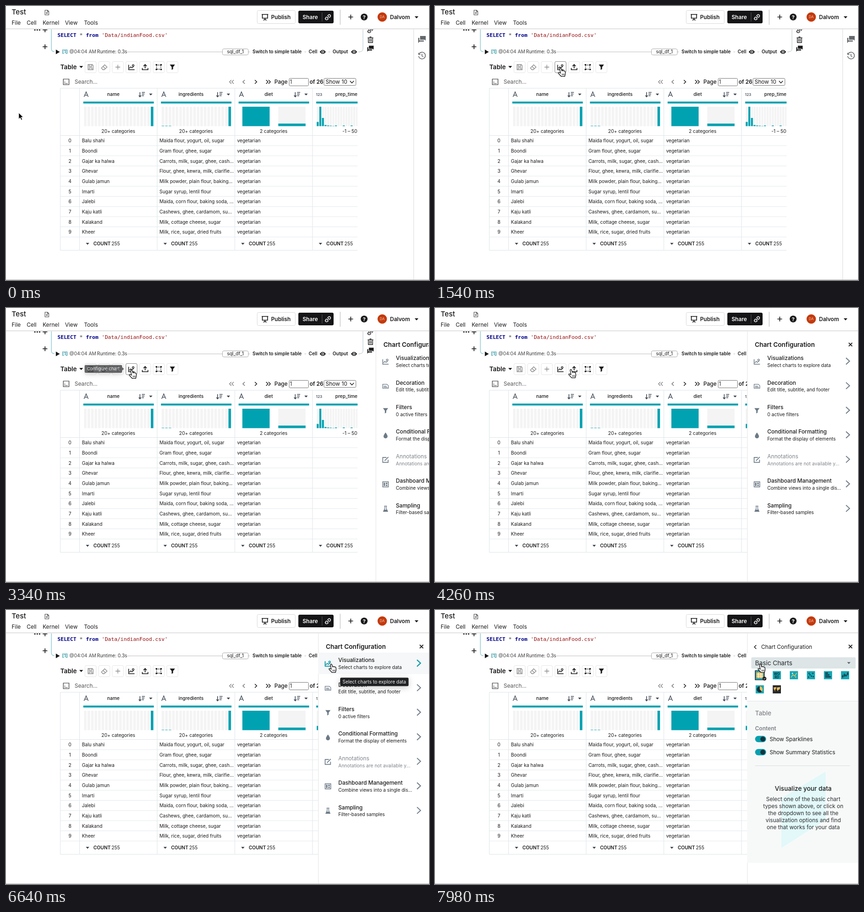
Write an HTML page that moves like this. It is 900 by 585 pixels and loops after 8000 ms.

```html
<!DOCTYPE html>
<html lang="en">
<head>
<meta charset="utf-8">
<title>Notebook chart configuration</title>
<style>
html, body { margin: 0; width: 100%; height: 100%; overflow: hidden; background: #fff; }
svg { display: block; width: 900px; height: 585px; font-family: Inter, sans-serif; }
.mono { font-family: "DejaVu Sans Mono", monospace; white-space: pre; }
.tip { filter: drop-shadow(0 3px 7px #0003); }
</style>
</head>
<body>
<svg id="stage" viewBox="0 0 900 585"></svg>
<script>
const TEAL = '#00a2b1', INK = '#1a1a1a', GRAY = '#6c7a86', GRID = '#dde6ea';
const SMALL = 10, BODY = 11.65, LARGE = 13.3;

const text = (x, y, size, str, { w = 400, fill = INK, anchor = 'start', cls = '' } = {}) =>
  `<text x="${x}" y="${y}" font-size="${size}" font-weight="${w}" fill="${fill}" text-anchor="${anchor}" class="${cls}">${str}</text>`;
const rect = (x, y, w, h, fill, extra = '') =>
  `<rect x="${x}" y="${y}" width="${w}" height="${h}" fill="${fill}" ${extra}/>`;
const box = (x, y, w, h, stroke, r = 3, fill = '#fff') =>
  rect(x + .5, y + .5, w - 1, h - 1, fill, `stroke="${stroke}" rx="${r}"`);
const line = (d, stroke = INK, w = 1, extra = '') =>
  `<path d="${d}" fill="none" stroke="${stroke}" stroke-width="${w}" ${extra}/>`;
const fill = (d, color = INK) => `<path d="${d}" fill="${color}"/>`;
const dot = (x, y, r, color = INK, extra = '') => `<circle cx="${x}" cy="${y}" r="${r}" fill="${color}" ${extra}/>`;
const at = (x, y, content, s = 1) => `<g transform="translate(${x} ${y}) scale(${s})">${content}</g>`;
const group = (id, content, extra = '') => `<g id="${id}" ${extra}>${content}</g>`;
const many = (n, f) => Array.from({ length: n }, (_, i) => f(i)).join('');

// Icons are drawn around their own centre.
const icon = {
  plus: (c = INK, w = 1.7) => line('M-5 0H5M0-5V5', c, w),
  caret: (c = INK) => fill('M-4-2H4L0 2.5Z', c),
  link: c => `<g transform="rotate(-45)">${line('M-1-2.7H-4a2.7 2.7 0 0 0 0 5.4H-1M1-2.7H4a2.7 2.7 0 0 1 0 5.4H1M-3 0H3', c, 1.5)}</g>`,
  eye: () => fill('M-6.5 0Q0-8.5 6.5 0Q0 8.5-6.5 0Z') + dot(0, 0, 2.7, '#fff') + dot(0, 0, 1.5),
  chat: c => fill('M-4-8H8V2L6 0H-4Z', c) + fill('M-8-4H-5.5V1.5H4V4H-5L-8 7Z', c),
  trash: () => line('M-6-4H6M-2-6H2', INK, 1.6) + line('M-4.5-3V6H4.5V-3M-1.5-2V4M1.5-2V4', INK, 1.4),
  clock: c => line('M-6-4A7.2 7.2 0 1 1-7 1M-7-6V-2.5H-3M0-4V0.5L3 2.5', c, 1.5),
  save: c => line('M-5.5-5.5H3.5L5.5-3.5V5.5H-5.5ZM-3-5V-1.5H2.5V-5M-3 5V1.5H3V5', c, 1.3),
  eraser: c => line('M-6 2L1-5 6 0 0 5.5H-3ZM-2.5-1.5L2.5 3.5', c, 1.3),
  chart: c => line('M-6-5V5.5H6.5M-4.5 2.5L-1.5-.5 1 1.5 4.5-1.5', c, 1.5) + dot(3.5, -3.5, 1.9, 'none', `stroke="${c}" stroke-width="1.4"`),
  upload: c => line('M0 2.5V-5M-3.5-2L0-5.5 3.5-2M-6 2V5.5H6V2', c, 1.7),
  frame: c => line('M-4.5-4.5H4.5V4.5H-4.5Z', c, 1.3, 'stroke-dasharray="2 1.4"') +
    [-1, 1].map(x => [-1, 1].map(y => rect(x * 5 - 1.5, y * 5 - 1.5, 3, 3, c)).join('')).join(''),
  funnel: c => fill('M-5.5-5.5H5.5L1.5 0V4L-1.5 6V0Z', c),
  card: c => line('M-6-4H3L6-1V4.5H-6ZM-4 0H2M-4 2.3H4', c, 1.3),
  drop: c => fill('M0-6Q4.3 0 4.3 2.2A4.3 4.3 0 0 1-4.3 2.2Q-4.3 0 0-6Z', c),
  edit: c => line('M2-5H-6V5.5H5.5V0M-2 2L6-6', c, 1.6),
  board: c => line('M-6-5.5H6V5.5H-6Z', c, 1.5) + rect(-4, -3.5, 3, 7, c) + rect(.5, -3.5, 3.5, 3, c) + rect(.5, .8, 3.5, 2.7, c),
  flask: c => line('M-3-6H3M-1.6-6V-1L-4.5 5.5H4.5L1.6-1V-6', c, 1.3) + fill('M-2.5 1.5H2.5L4.5 5.5H-4.5Z', c),
  letter: c => line('M-4.5 5.3L0-5.3 4.5 5.3M-3 1.8H3', c, 1.4),
  sort: c => line('M-3.5-5V4.5M-6 2L-3.5 5-1 2M.5-4.5H7M.5-1H6M.5 2.5H5', c, 1.5)
};

function header() {
  const menu = [[12, 'File'], [44, 'Cell'], [78, 'Kernel'], [125.5, 'View'], [166, 'Tools']];
  return rect(0, 0, 900, 49, '#fff') + line('M0 48.5H900', '#d4d4d4') + line('M0 49.5H900', '#eee') +
    text(12, 18, 15, 'Test', { w: 500 }) + menu.map(([x, s]) => text(x, 40, BODY, s)).join('') +
    at(87, 14, line('M-4-5H1.5L4-2.5V5H-4ZM1-5V-2H4M-2 1H2M0-1V3', '#444', 1.1)) +
    box(534, 9, 82, 29, '#d9d9d9') + at(551, 24, line('M-7-6H7M-5.5-6V2H5.5V-6M0 2V5M-3 6.5L0 4 3 6.5', INK, 1.7)) +
    text(564, 28, BODY, 'Publish', { w: 600 }) +
    rect(622, 10, 75, 27, '#151517', 'rx="3"') + text(631, 28, BODY, 'Share', { w: 600, fill: '#fff' }) +
    line('M672.5 14V33', '#555') + at(685, 24, icon.link('#fff')) +
    line('M711 8V40', '#d8d8d8', 2) + at(733.5, 23.5, icon.plus()) +
    dot(762, 23.5, 7.3) + text(762, 27.5, 11, '?', { w: 700, fill: '#fff', anchor: 'middle' }) +
    dot(800.5, 23.5, 10, '#c43a0c') + text(800.5, 26.3, 7.5, 'DA', { fill: '#f3c9b4', anchor: 'middle' }) +
    text(817, 28, BODY, 'Dalvom', { w: 600 }) + at(873.5, 24, icon.caret());
}

function codeCell() {
  const char = 6.71, label = { w: 600 };
  const code = (column, s, fill, w) => text(109.5 + column * char, 66, char / .602, s, { fill, w, cls: 'mono' });
  return [61.5, 66.5, 71.5].map(x => dot(x, 51, 1.6)).join('') +
    at(83, 51, icon.plus()) + at(83, 87, icon.plus()) +
    line('M96.5 49V91Q96.5 97.5 103 97.5', '#7cc3cd', 1.2) +
    line('M759.5 49V91Q759.5 97.5 753 97.5', '#b9c6ca') +
    code(0, 'SELECT', '#00008b', 700) + code(7, '*', '#333') +
    code(9, 'from', '#00008b', 700) + code(14, "'Data/indianFood.csv'", '#960f0f') +
    fill('M106 93L114.5 98 106 103Z') + text(119.5, 101.3, SMALL, '[1]', { w: 600, fill: '#0e8494' }) +
    text(135, 101.3, SMALL, '@04:04 AM', { fill: '#444' }) + text(193.5, 101.3, SMALL, 'Runtime: 0.3s', { fill: '#333' }) +
    line('M258 98H460M516 98H519M635 98H638.5M686 98H689.5M750 98H753', '#bbb') +
    box(460, 91, 56, 14, '#aaa') + text(488, 101.3, SMALL, 'sql_df_1', { anchor: 'middle' }) +
    text(524.5, 101.3, 9.9, 'Switch to simple table', label) + text(644, 101.3, 9.9, 'Cell', label) + at(674, 98, icon.eye()) +
    text(695, 101.3, 9.9, 'Output', label) + at(740.5, 98, icon.eye()) +
    at(775.5, 51.5, icon.link(INK)) + at(775.5, 72, icon.trash()) + at(775.5, 91.5, icon.chat(INK), .85);
}

function toolbar() {
  const icons = ['save', 'eraser', 'plus', 'chart', 'upload', 'frame', 'funnel'];
  const chevron = (x, d, c) => line(`M${x - 2 * d} 158L${x + 2 * d} 162 ${x - 2 * d} 166`, c, 1.5);
  return text(115.5, 134.7, LARGE, 'Table', { w: 600 }) + at(160, 130, icon.caret()) +
    icons.map((name, i) => box(167.5 + i * 29, 118, 25, 25, '#e6e6e6') +
      at(180 + i * 29, 130.5, icon[name](i < 3 ? '#8a8a8a' : INK, 1.3))).join('') +
    group('chartHover', box(254.5, 118, 25, 25, '#8c8c8c', 3, 'none')) +
    line('M122 156H134V168H122Z', '#333', 1.2) + line('M124.5 165.5H132M124.5 162.5H126', '#333', 1.5, 'stroke-dasharray="1.5 1"') +
    text(146, 166.4, BODY, 'Search...', { fill: '#555' }) +
    chevron(477.5, -1, '#888') + chevron(482.5, -1, '#888') + chevron(506, -1, '#777') +
    chevron(531.5, 1, INK) + chevron(555.5, 1, INK) + chevron(560.5, 1, INK) +
    text(571, 166.4, BODY, 'Page', { w: 500 }) + box(602, 154, 42, 17, '#777', 2) + text(604, 166.2, BODY - .6, '1') +
    text(646, 166.4, BODY, 'of 26', { w: 600 }) + box(676, 154, 69, 16, '#777', 2) +
    text(680, 166.4, BODY, 'Show 10') + line('M732 160L736 164.5 740 160', INK, 1.4);
}

const rows = [
  ['Balu shahi', 'Maida flour, yogurt, oil, sugar'],
  ['Boondi', 'Gram flour, ghee, sugar'],
  ['Gajar ka halwa', 'Carrots, milk, sugar, ghee, cash...'],
  ['Ghevar', 'Flour, ghee, kewra, milk, clarifie...'],
  ['Gulab jamun', 'Milk powder, plain flour, baking...'],
  ['Imarti', 'Sugar syrup, lentil flour'],
  ['Jalebi', 'Maida, corn flour, baking soda, ...'],
  ['Kaju katli', 'Cashews, ghee, cardamom, su...'],
  ['Kalakand', 'Milk, cottage cheese, sugar'],
  ['Kheer', 'Milk, rice, sugar, dried fruits']
];

function table() {
  const pitch = 21.67, mid = { anchor: 'middle' };
  const columns = [['name', '20+ categories'], ['ingredients', '20+ categories'], ['diet', '2 categories'], ['prep_time', '-1 – 500']];
  const bar = (x, w, h) => rect(x, 215, w, 41.5, '#f4f4f4') + (h ? rect(x, 256.5 - h, w, h, TEAL) : '');
  const bars = [
    x => many(20, i => bar(x + 9.5 + i * 7.48, 5.4, i == 19 ? 41.5 : 0)),
    x => many(20, i => bar(x + 9.5 + i * 7.48, 5.4, i == 19 ? 41.5 : i < 3 ? .8 : 0)),
    x => bar(x + 16, 58, 41.5) + bar(x + 92.5, 58, 5.5),
    x => [9, 41.5, 17.5, 2.5, 1.5, 1, .5, 1.5, 0, 0, 1.5, 0, 0, 1.5, 0, 0].map((h, i) => bar(x + 9 + i * 5.55, 4.2, h)).join('')
  ];
  let out = columns.map(([name, summary], c) => {
    const x = 156.5 + c * 165.2;
    return line(`M${x} 175.5V521.5`, GRID) +
      (c < 3 ? at(x + 14, 188.7, icon.letter('#4a5560')) : text(x + 7.5, 191.5, 7.8, '123', { w: 600, fill: '#4a5560' })) +
      text(x + 72, 192.2, SMALL, name, { w: 500, anchor: 'middle' }) +
      at(x + 132, 189, icon.sort('#3c4650')) + at(x + 151.5, 188.7, icon.caret('#3c4650'), .9) +
      rect(x + 8, 204, 150, 4.2, TEAL) + bars[c](x) + text(x + 82.5, 270.6, SMALL, summary, mid) +
      at(x + 17, 507.5, icon.caret('#333e48'), .9) +
      text(x + 29.5, 511.2, SMALL, 'COUNT', { w: 600 }) + text(x + 68, 511.2, SMALL, '255');
  }).join('');
  out += line('M115.5 522V175.5H748M115.5 276.5H748M115.5 521.5H748', GRID);
  out += rows.map(([name, ingredients], i) => {
    const y = 291.3 + i * pitch;
    return line(`M115.5 ${276.5 + (i + 1) * pitch}H748`, '#e3eaed') + text(136, y, SMALL, i, mid) +
      text(161.5, y, SMALL, name) + text(326.5, y, SMALL, ingredients) + text(491.7, y, SMALL, 'vegetarian');
  }).join('');
  return `<g clip-path="url(#tableClip)">${out}</g>`;
}

const options = [
  ['chart', 'Visualizations', 'Select charts to explore data'],
  ['card', 'Decoration', 'Edit title, subtitle, and footer'],
  ['funnel', 'Filters', '0 active filters'],
  ['drop', 'Conditional Formatting', 'Format the display of elements'],
  ['edit', 'Annotations', 'Annotations are not available y...'],
  ['board', 'Dashboard Management', 'Combine views into a single dis...'],
  ['flask', 'Sampling', 'Filter-based samples']
];

const optionMarks = (name, y, color) => at(685, y + 1, icon[name](color)) +
  line(`M874.5 ${y - 7}L882 ${y} 874.5 ${y + 7}`, color, 1.9);

function optionList() {
  return group('rowHover', rect(664, 91, 236, 46, '#f5f7f8')) +
    options.map(([name, title, note], i) => {
      const y = 113.5 + i * 52.4, off = i == 4, color = off ? '#7f848a' : INK;
      return optionMarks(name, y, GRAY) + text(707, y - 2.3, BODY, title, { fill: color, w: off ? 400 : 500 }) +
        text(707, y + 12.4, SMALL, note, { fill: color });
    }).join('') + group('rowMarks', optionMarks('chart', 113.5, TEAL));
}

function chartPicker() {
  const gold = '#f0c05a', dark = '#12303a';
  const glyphs = [
    rect(-7, -6, 14, 12, gold) + line('M-7-2H7M-7 2H7M-2.5-6V6M2.5-6V6', '#fff', 1),
    text(0, -.5, 7, 'WO', { w: 700, fill: dark, anchor: 'middle' }) + text(0, 6.5, 7, 'RD', { w: 700, fill: dark, anchor: 'middle' }),
    line('M-6 5L-2-1 2 2 6-5', gold, 1.5) + dot(-3, -4, 1.2, '#fff') + dot(4, 4, 1.2, gold),
    [[-5, 4], [-2, -1], [1, 2], [4, -4], [5, 3], [-4, -4]].map(([x, y]) => dot(x, y, 1.2, dark)).join(''),
    line('M-6-4.5H0M-6-.5H3M-6 3.5H6', dark, 2.6),
    line('M-5-1V6M-1.5-4V4M2-2V3M5.5-7V1', dark, 1) + line('M-5 1V4M-1.5-2V2M2-1V2M5.5-5V-1', dark, 2.6),
    dot(0, 0, 6.5, dark) + fill('M0 0V-6.5A6.5 6.5 0 0 1 4.5 4.5Z', gold),
    fill('M-7-4L-1-5-2-1-4 1-3 5-6 0ZM0-4L7-5 6 0 3 1 2 4 0 0Z', gold)
  ];
  const tiles = glyphs.map((g, i) => at(691 + i % 6 * 36.3, i < 6 ? 139.2 : 169.4,
    rect(-8.7, -8.7, 17.4, 17.4, i == 7 ? '#26282c' : '#14a7b4') + g)).join('');
  const toggle = y => rect(681, y - 6.7, 23.5, 13.4, '#05a0af', 'rx="6.7"') + dot(697.5, y, 5.3, '#17333d');
  const copy = ['Select one of the basic chart', 'types shown above, or click on', 'the dropdown to see all the', 'visualization options and find', 'one that works for your data'];
  return rect(664, 92, 236, 102, '#fff') + group('pickerHover', rect(673, 101, 222, 24, '#dde5e6', 'rx="2"')) +
    text(681, 118, LARGE, 'Basic Charts', { fill: '#26292c' }) + at(880.5, 113, icon.caret('#59636b'), .9) +
    tiles + line('M681.5 129.5H700.5V149H681.5Z', '#17272d', 1.7) +
    dot(701, 146.5, 4) + line('M699 146.5L700.6 148 703 145', '#fff', 1) +
    rect(664, 194, 236, 346, '#f7f9f9') + line('M664 194.5H900', '#dfe3e5') +
    text(681, 224.7, LARGE, 'Table', { w: 500, fill: '#808487' }) + text(681, 257, BODY, 'Content', { w: 600, fill: '#7b7f83' }) +
    toggle(275.5) + text(712, 279.7, BODY, 'Show Sparklines') +
    toggle(303.5) + text(712, 307.8, BODY, 'Show Summary Statistics') +
    line('M681 332.5H883', '#d9dde0') + fill('M737 402L831 345V448L737 508Z', '#e2f8f9') +
    text(783.5, 385.8, LARGE, 'Visualize your data', { w: 500, anchor: 'middle' }) +
    copy.map((s, i) => text(783.5, 408.3 + i * 14.85, BODY, s, { anchor: 'middle', fill: '#2b2e30' })).join('');
}

const tooltip = (id, x, y, w, h, tx, str, extra = '') => group(id,
  rect(x, y, w, h, '#202123', 'rx="2.5"') + extra + text(tx, y + h / 2 + 3.6, SMALL, str, { fill: '#f4f4f4' }), 'class="tip"');

document.getElementById('stage').innerHTML =
  `<defs><clipPath id="tableClip"><rect x="115" y="174" width="633" height="349"/></clipPath>
  <clipPath id="panelClip"><rect x="664" y="49" width="236" height="536"/></clipPath></defs>` +
  codeCell() + toolbar() + table() +
  line('M867.5 49V585', '#d9d9d9') + at(885, 72, icon.chat('#66696c')) + at(885, 106, icon.clock('#66696c')) +
  tooltip('chartTip', 161.8, 121.2, 85, 17.8, 167, 'Configure chart', fill('M246 125.5L251 130 246 134.5Z', '#202123')) +
  group('panel', rect(664, 49, 236, 536, '#fff') + line('M664.5 49V585', '#e4e4e4') +
    `<g clip-path="url(#panelClip)">${group('list', optionList())}${group('picker', chartPicker())}</g>` +
    group('listTitle', text(680.5, 83, LARGE, 'Chart Configuration', { w: 600 })) +
    group('pickerTitle', line('M683.5 75L679.5 79 683.5 83', INK, 1.5) + text(694, 83, BODY, 'Chart Configuration')) +
    line('M880.3 74.3L887.7 81.7M887.7 74.3L880.3 81.7', INK, 1.8) +
    tooltip('rowTip', 711, 144.5, 145.5, 18, 716, 'Select charts to explore data')) +
  header() + line('M0 584.5H900', '#b5b5b5') +
  group('arrow', `<path d="M0 0V13.5L3.2 10.5 5.4 15.5 7.7 14.5 5.5 9.6H9.7Z" stroke="#fff" stroke-width=".9"/>`) +
  group('hand', `<path d="M-1.8 1.6Q-.6-.8 1.2 1.2L3 6.5Q4.4 5 5.6 6.4 7 5.3 8 6.9 9.8 6.3 10 8.4L10.4 13 9 18.3H1.5L-4.6 11.6Q-5 9.4-2.8 9.9L0 11.3Z" fill="#fff" stroke="#111" stroke-width="1.3"/><path d="M3.4 12.5V16M5.6 12.5V16M7.7 12.5V16" stroke="#111" stroke-width=".9"/>`);

const el = Object.fromEntries([...document.querySelectorAll('g[id]')].map(g => [g.id, g]));
const show = (g, on) => g.setAttribute('visibility', on ? 'inherit' : 'hidden');
const move = (g, x, y = 0) => g.setAttribute('transform', `translate(${x} ${y})`);
const ramp = (t, start, length) => Math.min(1, Math.max(0, (t - start) / length));
const smooth = p => p * p * (3 - 2 * p);

// cubic-bezier(.4, 1, .75, .9), solved by bisection
function glide(p) {
  if (p <= 0 || p >= 1) return p;
  const curve = (s, a, b) => 3 * (1 - s) * (1 - s) * s * a + 3 * (1 - s) * s * s * b + s * s * s;
  let low = 0, high = 1;
  for (let i = 0; i < 20; i++) {
    const s = (low + high) / 2;
    if (curve(s, .4, .75) < p) low = s; else high = s;
  }
  return curve(low, 1, .9);
}

const OPEN = 3294, PUSH = 6940, PICKER_HOVER = 7240;
const stops = [[350, 1000, 267, 132], [4100, 1140, 678, 112], [5950, 500, 692, 115]];

function cursorAt(t) {
  return stops.reduce(([x, y], [start, length, tx, ty]) => {
    const p = smooth(ramp(t, start, length));
    return [x + (tx - x) * p, y + (ty - y) * p];
  }, [27, 228]);
}

function drawTip(tip, x, y, amount) {
  const s = .8 + .2 * amount;
  show(tip, amount > 0);
  tip.setAttribute('opacity', amount);
  tip.setAttribute('transform', `translate(${x * (1 - s)} ${y * (1 - s)}) scale(${s})`);
}

function render(t) {
  const [x, y] = cursorAt(t);
  const pushed = t >= PUSH, push = glide(ramp(t, PUSH, 400));
  const overButton = y < 142 && x > 254 && x < 366 && (x - 254.5) % 29 < 25;
  const overRow = x > 664 && !pushed, overPicker = t >= PICKER_HOVER;

  show(el.chartHover, overButton && x < 280);
  drawTip(el.chartTip, 251, 130, ramp(t, 1700, 100) - ramp(t, 3310, 100));

  show(el.panel, t >= OPEN);
  move(el.panel, 236 * (1 - glide(ramp(t, OPEN, 200))));
  show(el.rowHover, overRow);
  show(el.rowMarks, overRow);
  drawTip(el.rowTip, 783, 142, ramp(t, 5330, 100) - ramp(t, PUSH, 100));

  show(el.listTitle, !pushed);
  show(el.pickerTitle, pushed);
  show(el.list, push < 1);
  move(el.list, -120 * push, pushed ? 449 : 0);
  el.list.setAttribute('opacity', 1 - push);
  show(el.picker, pushed);
  move(el.picker, 236 * (1 - push));
  el.picker.setAttribute('opacity', push);
  show(el.pickerHover, overPicker);

  const pointing = overButton || overRow || overPicker;
  show(el.hand, pointing);
  show(el.arrow, !pointing);
  move(pointing ? el.hand : el.arrow, x, y);
}

function tick() {
  render(performance.now() % 8000);
  requestAnimationFrame(tick);
}
tick();
</script>
</body>
</html>
```
